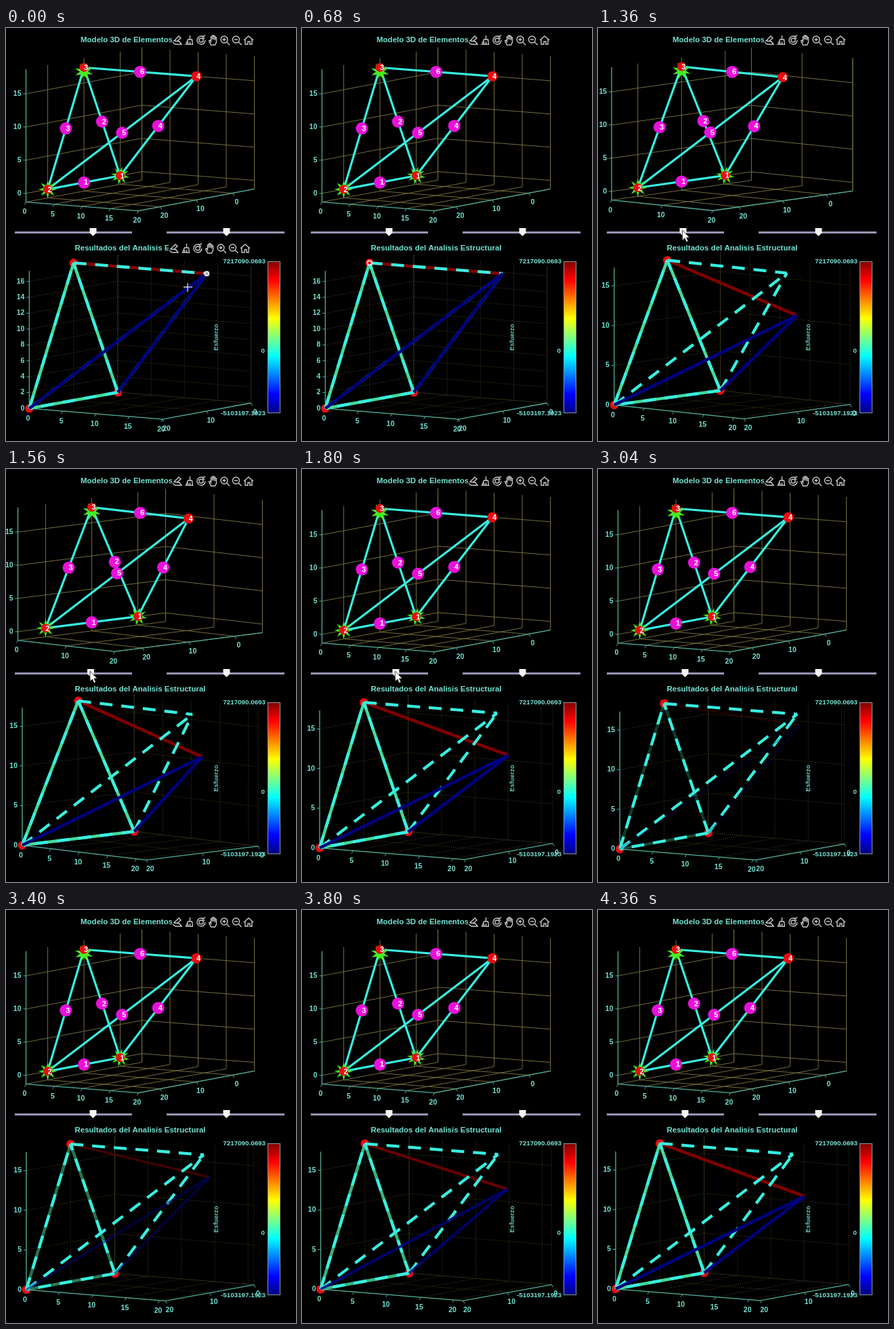
An HTML page with a canvas that plays this animation: 428x609 px, repeating every 4.64 s.

```html
<!DOCTYPE html>
<html lang="es">
<head>
<meta charset="utf-8">
<style>
  html, body { margin: 0; width: 100%; height: 100%; overflow: hidden; background: #000; }
  canvas { display: block; }
</style>
</head>
<body>
<canvas id="stage" width="428" height="609"></canvas>
<script>
const ctx = document.getElementById('stage').getContext('2d');
const LOOP = 4640, STEP = 40;
const FONT = '"Liberation Sans", Arial, sans-serif';
const TEXT = '#74e2d4', CYAN = '#38efe0', RED = '#e80c10', AXIS = '#4fae9c';

// Truss geometry in metres; members are pairs of node indices.
const HEIGHT = 17.32;
const NODES = [[0, 0, 0], [0, 20, 0], [0, 10, HEIGHT], [20, 10, HEIGHT]];
const MEMBERS = [[0, 1], [0, 2], [1, 2], [0, 3], [1, 3], [2, 3]];
const STRESS = ['#45d99b', '#45d99b', '#45d99b', '#000080', '#000080', '#800000'];

// Keyframes: [ms, value]
const HANDLE = [[1240, 0], [1280, -3], [1360, -3], [1500, -5], [1700, 0], [1800, 10], [1960, 10], [2160, 0]];
const TURN = [[1240, 0], [1320, 8], [1360, 8], [1520, 13], [1760, 0], [1800, 0], [1920, -12], [2160, 0]];
const DEFORM = [[0, 0], [800, 0], [1240, 1], [2679, 1], [2680, 0], [4040, 1]];
const FADE = [[2679, 1], [2680, 0], [4040, 1]];

function track(keys, t) {
  if (t <= keys[0][0]) return keys[0][1];
  for (let i = 1; i < keys.length; i++) {
    const [t0, a] = keys[i - 1], [t1, b] = keys[i];
    if (t <= t1) return a + (b - a) * (t - t0) / (t1 - t0);
  }
  return keys[keys.length - 1][1];
}

function line(points, color, width = 1, dash = []) {
  ctx.beginPath();
  points.forEach(p => ctx.lineTo(p[0], p[1]));
  ctx.strokeStyle = color;
  ctx.lineWidth = width;
  ctx.setLineDash(dash);
  ctx.stroke();
  ctx.setLineDash([]);
}

function polygon(points, color) {
  ctx.beginPath();
  points.forEach(p => ctx.lineTo(p[0], p[1]));
  ctx.closePath();
  ctx.fillStyle = color;
  ctx.fill();
}

function dot([x, y], r, color) {
  ctx.beginPath();
  ctx.arc(x, y, r, 0, 7);
  ctx.fillStyle = color;
  ctx.fill();
}

function text(str, x, y, { size = 10.5, align = 'center', color = TEXT } = {}) {
  ctx.font = `bold ${size}px ${FONT}`;
  ctx.textAlign = align;
  ctx.textBaseline = 'middle';
  ctx.fillStyle = color;
  ctx.fillText(str, x, y);
}

// Orthographic view centred on the floor of an axes box.
function makeView(box, degrees, scale, cx, cy) {
  const a = degrees * Math.PI / 180, c = Math.cos(a), s = Math.sin(a);
  const mx = (box.x[0] + box.x[1]) / 2, my = (box.y[0] + box.y[1]) / 2;
  return ([x, y, z]) => {
    const dx = x - mx, dy = y - my;
    return [cx + scale * (dx * c - dy * s),
            cy + scale * (0.121 * (dx * s + dy * c) - 0.992 * (z - box.z[0]))];
  };
}

function ticks([min, max], step) {
  const list = [];
  for (let v = Math.ceil(min / step) * step; v <= max + 0.01; v += step) list.push(v);
  return list;
}

function drawAxes(view, box, steps, gridColor, dash) {
  const [x0, x1] = box.x, [y0, y1] = box.y, [z0, z1] = box.z;
  const grid = (...pts) => line(pts.map(view), gridColor, 1, dash);
  const xs = ticks(box.x, steps.x), ys = ticks(box.y, 10), zs = ticks(box.z, steps.z);
  for (const x of xs) grid([x, y1, z0], [x, y0, z0], [x, y0, z1]);
  for (const y of ys) grid([x1, y, z0], [x0, y, z0], [x0, y, z1]);
  for (const z of zs) grid([x0, y1, z], [x0, y0, z], [x1, y0, z]);
  grid([x0, y0, z0], [x0, y0, z1]);
  grid([x1, y0, z0], [x1, y0, z1]);

  line([[x0, y1, z1], [x0, y1, z0], [x1, y1, z0], [x1, y0, z0]].map(view), AXIS, 1.3);
  const label = (value, point, dx, dy, tx, ty, align) => {
    const [px, py] = view(point);
    line([[px, py], [px + tx, py + ty]], AXIS);
    text(value, px + dx, py + dy, { align });
  };
  for (const x of xs) label(x, [x, y1, z0], -2, 15, -2, 4);
  for (const y of ys) label(y, [x1, y, z0], 6, 14, 2, 4);
  for (const z of zs) label(z, [x0, y1, z], -7, 0, -4, 0, 'right');
}

function drawSupport([x, y], tilt) {
  const spikes = [];
  for (let i = 0; i < 16; i++) {
    const r = i % 2 ? 6 : 14, a = tilt + i * Math.PI / 8;
    spikes.push([x + r * Math.cos(a), y + r * 0.95 * Math.sin(a)]);
  }
  polygon(spikes, '#45ee20');
}

function drawModel(turn) {
  const box = { x: [0, 20], y: [-6, 26], z: [-1.3, 18.7] };
  const angle = 32.8 + turn;
  const view = makeView(box, angle, 9.87, 198, 247);
  drawAxes(view, box, { x: angle > 37 ? 10 : 5, z: 5 }, '#746d3c', []);

  const pts = NODES.map(view);
  MEMBERS.forEach(([a, b]) => line([pts[a], pts[b]], CYAN, 3.2));
  drawSupport(pts[0], 0.2);
  drawSupport(pts[1], 0);
  drawSupport([pts[2][0], pts[2][1] + 6], 0.35);
  pts.forEach((p, i) => {
    dot(p, i < 3 ? 6.5 : 7.5, RED);
    text(i + 1, p[0] + 3, p[1] + 1, { color: '#fff', size: 11 });
  });
  MEMBERS.forEach(([a, b], i) => {
    const mid = [(pts[a][0] + pts[b][0]) / 2, (pts[a][1] + pts[b][1]) / 2];
    dot(mid, 9, '#ea10dc');
    text(i + 1, mid[0] + 3, mid[1] + 0.5, { color: '#fff', size: 11 });
  });
  text('Modelo 3D de Elementos', 110, 17.5, { size: 11.5, align: 'left' });
}

function drawResults(turn, deform, fade, t) {
  const box = { x: [0, 20 + 1.7 * deform], y: [0, 20], z: [0, HEIGHT] };
  const view = makeView(box, 33.6 + turn, 11.8, 198, 557 - 1.5 * deform);
  drawAxes(view, box, { x: 5, z: deform > 0.05 ? 5 : 2 }, '#4a4726', [1, 2]);

  const rest = NODES.map(view), bent = rest.slice();
  bent[3] = view([20 + 1.7 * deform, 10, HEIGHT - 5.2 * deform]);
  rest.slice(0, 3).forEach(p => dot(p, 6.3, RED));

  const stressed = i => {
    const [a, b] = MEMBERS[i];
    ctx.globalAlpha = fade;
    line([bent[a], bent[b]], STRESS[i], i < 3 ? 4.5 : 1.5 + 3 * fade);
    ctx.globalAlpha = 1;
  };
  [5, 0, 1, 2].forEach(stressed);
  MEMBERS.forEach(([a, b]) => line([rest[a], rest[b]], CYAN, 4.3, [19, 13]));
  [3, 4].forEach(stressed);

  if (t < 800) {
    const hovered = rest[t < 360 ? 3 : 2];
    dot(hovered, 4, '#f2f2f2');
    dot(hovered, 2.4, t < 360 ? '#b5b5b5' : RED);
  }
  text('Resultados del Analisis Estructural', 198, 324.5, { size: 11.5 });
}

function drawColorbar() {
  const jet = ctx.createLinearGradient(0, 344, 0, 568);
  ['#800000', '#f00', '#ff0', '#0ff', '#00f', '#000080']
    .forEach((c, i) => jet.addColorStop([0, 0.125, 0.375, 0.625, 0.875, 1][i], c));
  ctx.fillStyle = jet;
  ctx.fillRect(386, 344, 18, 224);
  ctx.strokeStyle = '#8a9a9a';
  ctx.lineWidth = 1;
  ctx.strokeRect(386.5, 344.5, 18, 223);
  const style = { size: 9.8, align: 'right' };
  text('7217090.0693', 383, 344, style);
  text('0', 382, 476, style);
  text('-5103197.1923', 383, 568, style);
  ctx.save();
  ctx.translate(310, 456);
  ctx.rotate(-Math.PI / 2);
  text('Esfuerzo', 0, 0, { size: 9.3, color: '#62c9bd' });
  ctx.restore();
}

const LENS = 'M4 -1A5 5 0 1 1 -6 -1A5 5 0 1 1 4 -1M3 3L7 7M-3.5 -1H1.5';
const ICONS = [
  'M-7 3L-3 6H6L3 2L-5 1L2 -6L5 -3L-1 2',
  'M1 -7V-1M-2 -1H4L5 6H-5Z M-2 6V2M1 6V2',
  'M6 0A6 6 0 1 1 3 -5.2M6 -7L2 -5L5 -2M-3 -2L0 -3L3 -2V2L0 3L-3 2Z',
  'M-3 7L-6 1L-4 0L-3 2V-5H-1V-1V-7H1V-1V-6H3V0V-4H5V3L3 7Z',
  LENS + 'M-1 -3.5V1.5',
  LENS,
  'M-7 0L0 -6L7 0M-5 -1V6H-1V2H2V6H5V-1'
].map(d => new Path2D(d));

function drawToolbar(left, y) {
  ctx.fillStyle = '#000';
  ctx.fillRect(left - 8, y - 9, 122, 18);
  ctx.strokeStyle = '#c8c8c8';
  ctx.lineWidth = 1.4;
  ICONS.forEach((icon, i) => {
    ctx.save();
    ctx.translate(left + i * 17.5, y);
    ctx.stroke(icon);
    ctx.restore();
  });
}

function drawSlider(x0, x1, x) {
  line([[x0, 301.5], [x1, 301.5]], '#9993b5', 3);
  polygon([[x - 5, 295], [x + 5, 295], [x + 5, 302], [x, 307], [x - 5, 302]], '#f4f4f4');
}

function drawArrow(x, y) {
  const shape = [[0, 0], [0, 15], [3.5, 12], [6, 17.5], [8.5, 16.5], [6, 11], [10.5, 11]]
    .map(([dx, dy]) => [x + dx, y + dy]);
  polygon(shape, '#fff');
  line([...shape, shape[0]], '#222', 0.8);
}

function drawCrosshair(t) {
  const k = Math.min(t / 440, 1), x = 268 - 169 * k, y = 382 - 36 * k;
  line([[x - 6, y], [x + 7, y]], '#eee', 1.2);
  line([[x, y - 6], [x, y + 7]], '#eee', 1.2);
}

function draw(t) {
  ctx.fillStyle = '#000';
  ctx.fillRect(0, 0, 428, 609);
  const turn = track(TURN, t), handle = 128.5 + track(HANDLE, t);
  drawModel(turn);
  drawToolbar(253, 18);
  drawSlider(13, 186, handle);
  drawSlider(237, 411, 325.5);
  drawResults(turn, track(DEFORM, t), track(FADE, t), t);
  drawColorbar();
  if (t < 520) {
    drawToolbar(248, 325);
    drawCrosshair(t);
  }
  if (t >= 1240 && t < 2160) drawArrow(handle - 1, 298);
}

function tick(now) {
  draw(Math.floor(now % LOOP / STEP) * STEP);
  requestAnimationFrame(tick);
}
requestAnimationFrame(tick);
</script>
</body>
</html>
```
